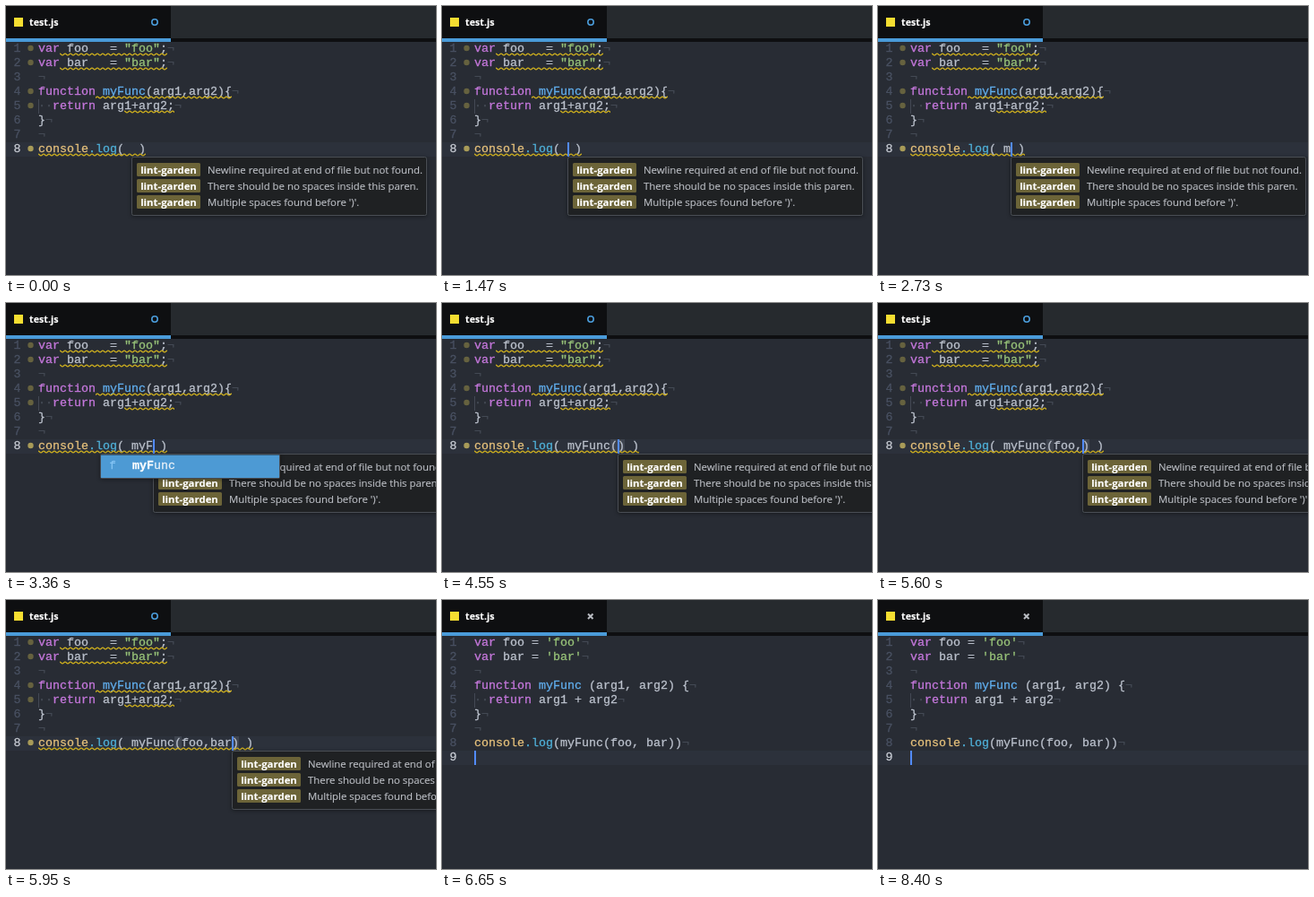
An HTML page that plays this animation: 480x300 px, repeating every 8.75 s.

```html
<!DOCTYPE html>
<html lang="en">
<head>
<meta charset="utf-8">
<title>Lint on save</title>
<style>
  html, body { margin: 0; width: 100%; height: 100%; overflow: hidden; background: #282c34; }
  svg { display: block; width: 480px; height: 300px; }
  text { white-space: pre; fill: currentColor; stroke: currentColor; stroke-width: .15; }
  tspan { fill: currentColor; stroke: currentColor; }
  .code { font: 13.33px "Liberation Mono", "Courier New", monospace; color: #bcc2cd; stroke-width: .28; }
  .ui { font: 11.4px "Open Sans", "Noto Sans", sans-serif; color: #bbbec4; }
  .b { font-weight: 700; color: #fff; }
  .tab { font-size: 10.7px; }
  .hint { font-size: 11.3px; stroke-width: .1; }
  .box { filter: drop-shadow(0 1px 2px rgba(0, 0, 0, .4)); }
</style>
</head>
<body>
<svg id="stage" viewBox="0 0 480 300"></svg>
<script>
const LOOP = 8750, LEFT = 36, TOP = 40, CH = 8, LH = 16;
const stage = document.getElementById('stage');

const draft = [
  'var foo   = "foo";', 'var bar   = "bar";', '',
  'function myFunc(arg1,arg2){', '  return arg1+arg2;', '}', ''
];
const tidy = [
  "var foo = 'foo'", "var bar = 'bar'", '',
  'function myFunc (arg1, arg2) {', '  return arg1 + arg2', '}', '',
  'console.log(myFunc(foo, bar))', ''
];

// [row, first column, last column] of the lint underlines
const flaws = [[0, 3, 18], [1, 3, 18], [3, 8, 27], [4, 12, 19]];
const notes = [
  'Newline required at end of file but not found.',
  'There should be no spaces inside this paren.',
  "Multiple spaces found before ')'."
];

// Popups: start column, then [word, bold letter positions, kind, hint]
const callMenu = n => ({ col: 13, items: [['myFunc', [0, 1, 2].slice(0, n), 'f', '']] });
const wordMenu = {
  col: 20,
  items: [
    ['for', [0, 1], 's', 'for'], ['forin', [0, 1], 's', 'for in'],
    ['forof', [0, 1], 's', 'for of'], ['foo', [0, 1], '', ''],
    ['function', [0, 6], '', '']
  ]
};
const shortMenu = {
  col: 20,
  items: [['foo', [0, 1, 2], '', ''], ['forof', [0, 1, 3], 's', 'for of']]
};

// [start ms, typed text, caret shown, popup]; null text means the file is saved
const steps = [
  [0, '', 0], [1470, '', 1], [1820, '', 0], [2310, '', 1],
  [2730, 'm', 1], [2870, 'my', 1], [2940, 'my', 1, callMenu(2)],
  [3290, 'myF', 1, callMenu(2)], [3360, 'myF', 1, callMenu(3)],
  [3710, 'myFunc', 1], [4270, 'myFunc', 0], [4550, 'myFunc(', 1],
  [4970, 'myFunc(f', 1], [5040, 'myFunc(fo', 1],
  [5180, 'myFunc(foo', 1, wordMenu], [5250, 'myFunc(foo', 1, shortMenu],
  [5600, 'myFunc(foo,', 1], [5810, 'myFunc(foo,b', 1],
  [5880, 'myFunc(foo,ba', 1], [5950, 'myFunc(foo,bar', 1], [6510, 'myFunc(foo,bar', 0],
  [6650, null, 1], [7140, null, 0], [7560, null, 1], [7980, null, 0], [8400, null, 1]
];

const colX = c => LEFT + c * CH;
const rowY = r => TOP + r * LH;
const rect = (x, y, w, h, fill, more = '') =>
  `<rect x="${x}" y="${y}" width="${w}" height="${h}" fill="${fill}" ${more}/>`;
const text = (x, y, cls, body, more = '') =>
  `<text x="${x}" y="${y}" class="${cls}" ${more}>${body}</text>`;
const tint = (color, s) => `<tspan style="color:${color}">${s}</tspan>`;

const syntax = [
  [/^(var|function|return)$/, '#c678dd'], [/^["']/, '#98c379'],
  [/^console$/, '#e5c07b'], [/^\.log$/, '#4fb0d8'], [/^myFunc$/, '#61afef'],
  [/^ +$/, '#454b56']
];
function paint(line) {
  const parts = /\b(?:var|function|return)\b|"[^"]*"|'[^']*'|console|\.log|myFunc(?= ?\(arg)|^ +/g;
  return line.replace(parts, s => {
    const color = syntax.find(([re]) => re.test(s))[1];
    return tint(color, s[0] === ' ' ? '·'.repeat(s.length) : s);
  });
}

function codeRow(line, r, active) {
  const y = rowY(r) + 11;
  return text(8.5, y, 'code', r + 1, `style="color:${active ? '#c8ccd4' : '#495162'}"`) +
    (line[0] === ' ' ? rect(LEFT, rowY(r), 1, LH, '#434954') : '') +
    text(LEFT, y, 'code', paint(line) + (active ? '' : tint('#454b56', '¬')));
}

const wave = (r, from, to) =>
  rect(colX(from), rowY(r), (to - from) * CH, LH, 'url(#wave)');
const dot = (r, fill) => `<circle cx="27.5" cy="${rowY(r) + 7}" r="3.2" fill="${fill}"/>`;

function tabs(saved) {
  const mark = saved
    ? '<path d="M163 15.5l5.5 5.5m0-5.5l-5.5 5.5" stroke="#b9bcc2" stroke-width="2"/>'
    : '<circle cx="166" cy="18" r="3.2" fill="none" stroke="#4a9bd9" stroke-width="1.6"/>';
  return rect(0, 0, 480, 36, '#262a2e') + rect(0, 0, 184, 36, '#0e0f11') +
    rect(184, 36, 296, 4, '#0e0f11') + rect(0, 36, 184, 4, '#4a9bd9') +
    rect(9, 13, 10, 10, '#f5de31') + text(26, 22, 'ui b tab', 'test.js') + mark;
}

function tooltip(x) {
  const rows = notes.map((note, i) => {
    const y = 175 + i * 18;
    return rect(x + 6, y, 71, 15, '#6c6438', 'rx="1.5"') +
      text(x + 41.5, y + 11.7, 'ui b', 'lint-garden', 'text-anchor="middle"') +
      text(x + 85, y + 11.7, 'ui', note);
  });
  return rect(x + .5, 168.5, 329, 65, '#1f2123', 'class="box" stroke="#4a4e55" rx="2"') + rows.join('');
}

function menu({ col, items }) {
  const x = colX(col) - 35, h = items.length * 26;
  const rows = items.map(([word, strong, kind, hint], i) => {
    const y = 169 + i * 26, on = i === 0, mid = y + 12.5;
    let out = on ? rect(x + 1, y + .5, 199, 25.5, '#4d9ad4') : '';
    if (kind === 's') {
      const c = on ? '#a9d08a' : '#98c379';
      out += rect(x + 1, y + .5, 26, 25.5, on ? '#5a9fcb' : '#3a3f35') +
        `<path d="M${x + 8} ${mid}h6" stroke="${c}" stroke-width="2"/>` +
        `<path d="M${x + 13} ${mid - 3.5}l5 3.5l-5 3.5z" fill="${c}"/>` +
        `<path d="M${x + 20} ${mid - 4}v8" stroke="${c}" stroke-width="2"/>`;
    }
    if (kind === 'f') out += text(x + 10.5, y + 16, 'code', 'f', 'style="color:#85c4f4;font-size:12px"');
    const letters = [...word]
      .map((c, k) => strong.includes(k) ? `<tspan class="b">${c}</tspan>` : c).join('');
    return out +
      text(x + 36, y + 16, 'code', letters, `style="color:${on ? '#e8f1f8' : '#c9ccd2'}"`) +
      text(x + 190, y + 16, 'code hint', hint,
        `text-anchor="end" style="color:${on ? '#86bce3' : '#5a5d62'}"`);
  });
  return rect(x + .5, 168.5, 200, h + 1, '#1f2123', 'class="box" stroke="#474b52" rx="1"') + rows.join('');
}

const defs = `<defs><pattern id="wave" x="${LEFT}" y="${TOP}" width="6" height="16" patternUnits="userSpaceOnUse">
  <path d="M-1.5 14q1.5 -1.6 3 0t3 0t3 0" fill="none" stroke="#cbad1d" stroke-width="1.3"/></pattern></defs>`;

function view([, typed, caret, popup]) {
  const saved = typed === null;
  const inCall = !saved && typed.includes('(');
  const call = saved ? '' : `console.log( ${typed}${inCall ? ')' : ''} )`;
  const lines = saved ? tidy : [...draft, call];
  const row = lines.length - 1;
  const col = saved ? 0 : 13 + typed.length;
  let out = defs + rect(0, 0, 480, 300, '#282c34') + tabs(saved) +
    rect(0, rowY(row), 480, LH, '#2c313b');
  if (inCall) out += [19, col].map(c => rect(colX(c), rowY(row), CH, 15, '#3e444f')).join('');
  out += lines.map((line, r) => codeRow(line, r, r === row)).join('');
  if (!saved) {
    out += flaws.map(([r, a, b]) => wave(r, a, b) + dot(r, '#66623f')).join('') +
      wave(row, 0, call.length) + dot(row, '#a89b58');
  }
  if (caret) out += rect(colX(col), rowY(row), 2, LH, '#528bff');
  if (!saved) out += tooltip(colX(col));
  if (popup) out += menu(popup);
  return out;
}

let shown = -1;
function tick() {
  const t = performance.now() % LOOP;
  const now = steps.findLastIndex(s => s[0] <= t);
  if (now !== shown) {
    shown = now;
    stage.innerHTML = view(steps[now]);
  }
  requestAnimationFrame(tick);
}
tick();
</script>
</body>
</html>
```
